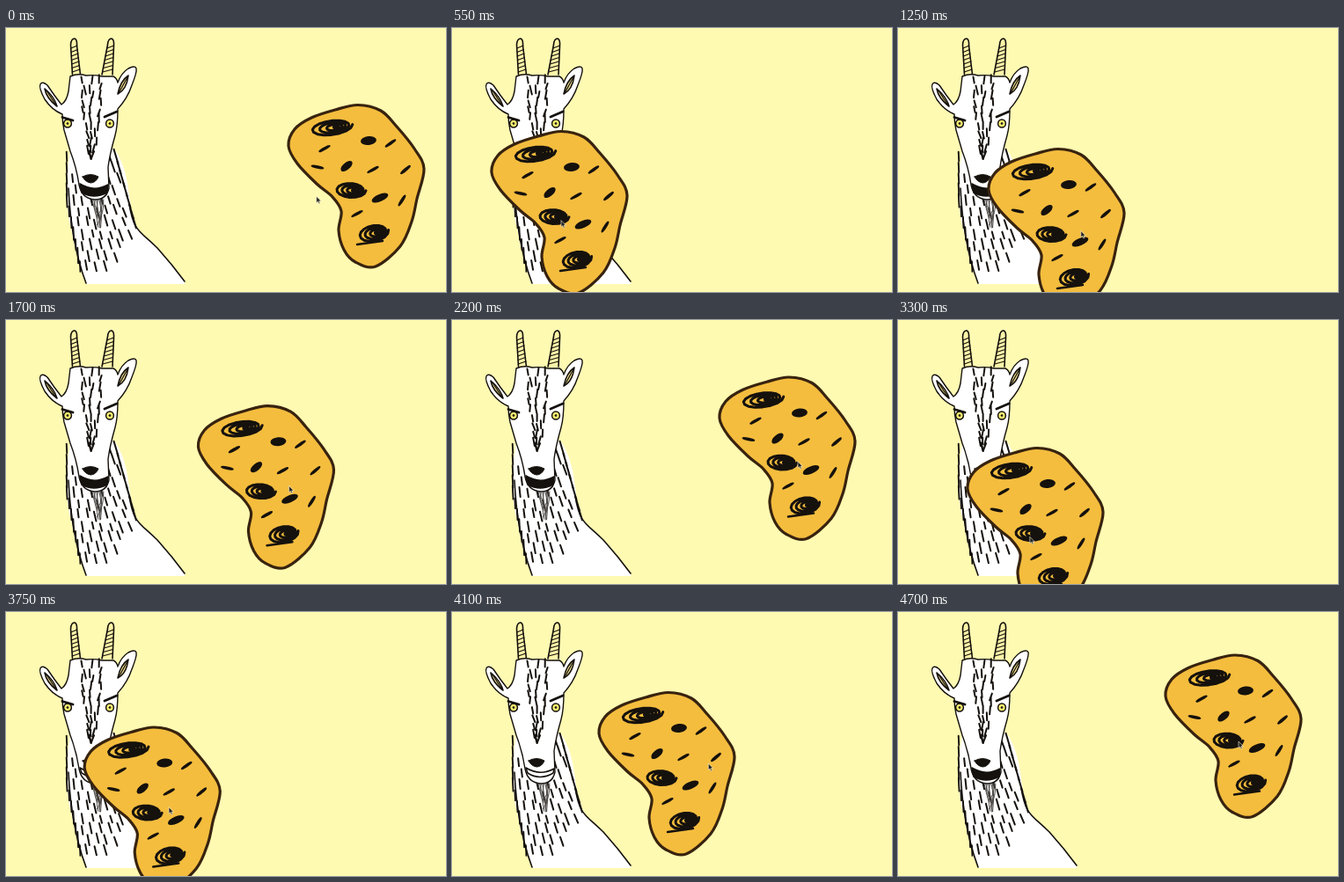
An HTML page that plays this animation: 500x300 px, repeating every 4.75 s.

```html
<!DOCTYPE html>
<html lang="en">
<head>
<meta charset="utf-8">
<title>Feeding the goat</title>
<style>
  html, body { margin: 0; height: 100%; overflow: hidden; background: #fffab2; }
  svg { display: block; width: 100%; height: 100%; }
  path { stroke-linecap: round; stroke-linejoin: round; }
</style>
</head>
<body>
<svg viewBox="0 0 500 300">
  <g id="goat"></g>
  <g id="cookie"></g>
  <path id="cursor" d="M0 0V7.2L1.7 5.7L3 8.3L4.2 7.7L3 5.2H5.2Z" fill="#222" stroke="#fff8dc" stroke-width=".6"/>
</svg>
<script>
const INK = '#15110d', CRUST = '#38230f', DOUGH = '#f4bd3e', CREAM = '#fff5a8';
const [goat, cookie, cursor] = ['goat', 'cookie', 'cursor'].map(id => document.getElementById(id));

let seed = 7;
const random = () => (seed = seed * 16807 % 2147483647) / 2147483647;
const jitter = size => (random() - 0.5) * size;
const ramp = (t, from, to) => Math.max(0, Math.min(1, (t - from) / (to - from)));

function path(parent, d, width, fill = 'none', stroke = INK) {
  const el = document.createElementNS('http://www.w3.org/2000/svg', 'path');
  for (const [key, value] of Object.entries({ d, fill, stroke, 'stroke-width': width })) el.setAttribute(key, value);
  return parent.appendChild(el);
}

const oval = (x, y, rx, ry, turn = 0) =>
  `M${x - rx * Math.cos(turn)} ${y - rx * Math.sin(turn)}` +
  `a${rx} ${ry} ${turn * 180 / Math.PI} 1 1 ${2 * rx * Math.cos(turn)} ${2 * rx * Math.sin(turn)}` +
  `a${rx} ${ry} ${turn * 180 / Math.PI} 1 1 ${-2 * rx * Math.cos(turn)} ${-2 * rx * Math.sin(turn)}`;

// Closed smooth curve through the points
function blob(text) {
  const p = text.split(' ').map(s => s.split(',').map(Number)), n = p.length;
  return 'M' + p[0] + p.map((b, i) => {
    const a = p[(i + n - 1) % n], c = p[(i + 1) % n], e = p[(i + 2) % n];
    return `C${b.map((v, k) => v + (c[k] - a[k]) / 6)} ${c.map((v, k) => v - (e[k] - b[k]) / 6)} ${c}`;
  }).join('') + 'Z';
}

function hair(x, y, length, lean, width) {
  const h = length * (0.75 + random() * 0.5) / 2, s = lean * h;
  path(goat, `M${x - s} ${y - h}L${x + s} ${y + h}`, width);
}

function drawNeck() {
  const side = 'C145 232 152 230 172 250Q189 269 203 288';
  path(goat, `M73 140Q64 190 74 228Q80 262 91 291H203V288Q189 269 172 250C152 230 145 232 140 190Q136 155 123 137Z`, 0, '#fff', 'none');
  path(goat, 'M71 182Q74 245 91 290M140 200' + side, 1.6);
  for (let y = 146, row = 0; y < 275; y += 12.5, row++) {
    const left = 69 + Math.max(0, y - 195) * 0.2;
    const right = y < 235 ? 125 + (y - 146) * 0.28 : 150 - (y - 235) * 0.9;
    hair(left, y, 14, 0.05, 1.9);
    for (let x = left + 7 + row % 2 * 4; x < right - 3; x += 10.5)
      hair(x + jitter(2), y + jitter(5), 10, 0.1 + (x - 75) * 0.005, 2);
    if (y < 225) hair(right, y, 15, 0.3, 2);
  }
}

function horn(base, tip, width) {
  const top = 13, bottom = 53, mid = (base + tip) / 2;
  path(goat, `M${base - width} ${bottom}L${tip - 3.5} ${top + 6}Q${tip - 3} ${top - 1} ${tip + 1} ${top - 1}` +
    `Q${tip + 4} ${top} ${tip + 3.5} ${top + 7}L${base + width} ${bottom}`, 1.6, CREAM);
  for (let k = 1; k < 8; k++) {
    const u = k / 8, x = tip + (base - tip) * u, w = 3.5 + (width - 3.5) * u, y = top + 4 + u * 36;
    path(goat, `M${x - w} ${y + 1.5}L${x + w} ${y - 1.5}`, 1.2);
  }
}

function drawHead() {
  horn(80, 77, 4.5);
  horn(115, 119, 6);
  path(goat, 'M73 55Q82 51 91 54Q101 53 109 55L122 55Q126 57 127 62Q131 51 139 46Q147 42 148 46' +
    'Q149 50 143 65Q138 80 127 92Q127 111 124 122Q118 143 116 158L117 182Q114 195 101 195Q86 194 83 178' +
    'Q80 158 73 140L66 116Q64 107 64 98Q52 93 44 81Q37 68 39 64Q41 60 47 65Q55 77 63 87Q69 83 71 72Z', 1.4, '#fff');
  path(goat, 'M44 69Q46 80 58 89Q55 78 44 69ZM139 54Q130 60 127 75Q137 70 139 54Z', 1.6, '#f7e795');
  path(goat, 'M46 71L57 88M138 56L128 74', 1.3);

  for (let y = 60; y < 148; y += 8.5) {
    const spread = 9 * (1 - ramp(y, 90, 170));
    for (const k of [-1, 0, 1]) hair(97 + k * spread + jitter(4), y + jitter(5), 8, jitter(0.5) - k * 0.15, 2);
  }

  for (const x of [70, 118]) {
    path(goat, oval(x, 108.5, 4.4, 4.6), 1.5, '#f5ec70');
    path(goat, oval(x, 108.5, 0.8, 1), 1, INK);
  }
  path(goat, 'M64 101.5L76 105M112 101L126 95', 2.8);
  path(goat, 'M87 169Q96 164 105 169Q102 176 96 176Q90 175 87 169Z', 1, INK);
  for (let k = 0; k < 9; k++) {
    const x = 98 + k * 1.6;
    path(goat, `M${x} 195Q${x + jitter(8)} 210 ${106 + jitter(8)} ${212 + random() * 20}`, 1, 'none', '#4a4744');
  }
}

// Outline of a dark chip, filled by a loosening spiral
function scribble(x, y, rx, ry, turn) {
  let d = '';
  for (let a = 0; a < 24; a += 0.4) {
    const r = 1 - a / 26, u = rx * r * Math.cos(a) + rx * (1 - r) * 0.35, v = ry * r * Math.sin(a);
    d += `${d ? 'L' : 'M'}${x + u * Math.cos(turn) - v * Math.sin(turn)} ${y + u * Math.sin(turn) + v * Math.cos(turn)}`;
  }
  path(cookie, d, 3, 'none', INK);
}

function drawCookie() {
  path(cookie, blob('347,102 374,93 400,87.5 426,94 444,112 464,137 475,160 467,194 461,220 ' +
    '448,248 420,271 397,266 384,252 378,230 381,208 371,192 353,177 331,154 321,134 328,115'), 3.2, DOUGH, CRUST);
  scribble(369, 113, 25, 9, -0.14);
  scribble(391, 184, 18, 9, 0.05);
  scribble(417, 233, 18, 10, -0.2);
  path(cookie, 'M399 246L428 242', 2.5);
  path(cookie, oval(412, 128, 8, 4, -0.1) + oval(387, 157, 7, 3, -0.7) + oval(425, 193, 9, 3, -0.4), 2, INK);
  for (const [x, y, turn] of [[437, 131, -0.6], [362, 137, -0.5], [354, 158, 0.2], [417, 161, -0.5],
    [454, 161, -0.7], [450, 196, -1], [399, 211, -0.5]])
    path(cookie, oval(x, y, 6.5, 0.8, turn), 2, INK);
}

// Drag key points: time, x shift, y shift; the cookie trails the cursor by LAG
const LOOP = 4750, STEP = 50, LAG = 100;
const drag = [
  [0, 0, 0], [550, -276, 30], [650, -280, 33], [1250, -218, 50], [1650, -113, 14], [2200, -17, -22.5],
  [2450, -14, -24], [2750, -28, -18], [3300, -242, 58], [3800, -226, 40], [4100, -154, 4],
  [4300, -75, -28], [4700, -17, -38.5]
];

function shift(t) {
  const last = drag.length - 1;
  t = Math.min(t, drag[last][0]);
  let i = 0;
  while (i < last - 1 && drag[i + 1][0] <= t) i++;
  const a = drag[Math.max(0, i - 1)], b = drag[i], c = drag[i + 1], e = drag[Math.min(last, i + 2)];
  const span = c[0] - b[0], u = (t - b[0]) / span, v = 1 - u;
  return [1, 2].map(k => {
    const m0 = (c[k] - a[k]) / (c[0] - a[0]) * span, m1 = (e[k] - b[k]) / (e[0] - b[0]) * span;
    return b[k] * (1 + 2 * u) * v * v + m0 * u * v * v + c[k] * u * u * (3 - 2 * u) - m1 * u * u * v;
  });
}

drawNeck();
drawHead();
drawCookie();
const mouth = path(goat, '', 1.5);

function draw(now) {
  const t = Math.floor(now % LOOP / STEP) * STEP;
  const [x, y] = shift(t), [cx, cy] = shift(t + LAG);
  cookie.setAttribute('transform', `translate(${x} ${y})`);
  cursor.setAttribute('transform', `translate(${cx + 404} ${cy + 186})`);

  const bite = ramp(t, 3600, 3750) - ramp(t, 4150, 4350);
  mouth.setAttribute('d', `M84 177Q100 187 116 178L115 ${187 - 4 * bite}Q100 ${195 - 3 * bite} 86 ${187 - 4 * bite}Z`);
  mouth.setAttribute('fill', bite > 0.5 ? '#fff' : INK);
}

const start = performance.now();
function tick() {
  draw(performance.now() - start);
  requestAnimationFrame(tick);
}
tick();
</script>
</body>
</html>
```
